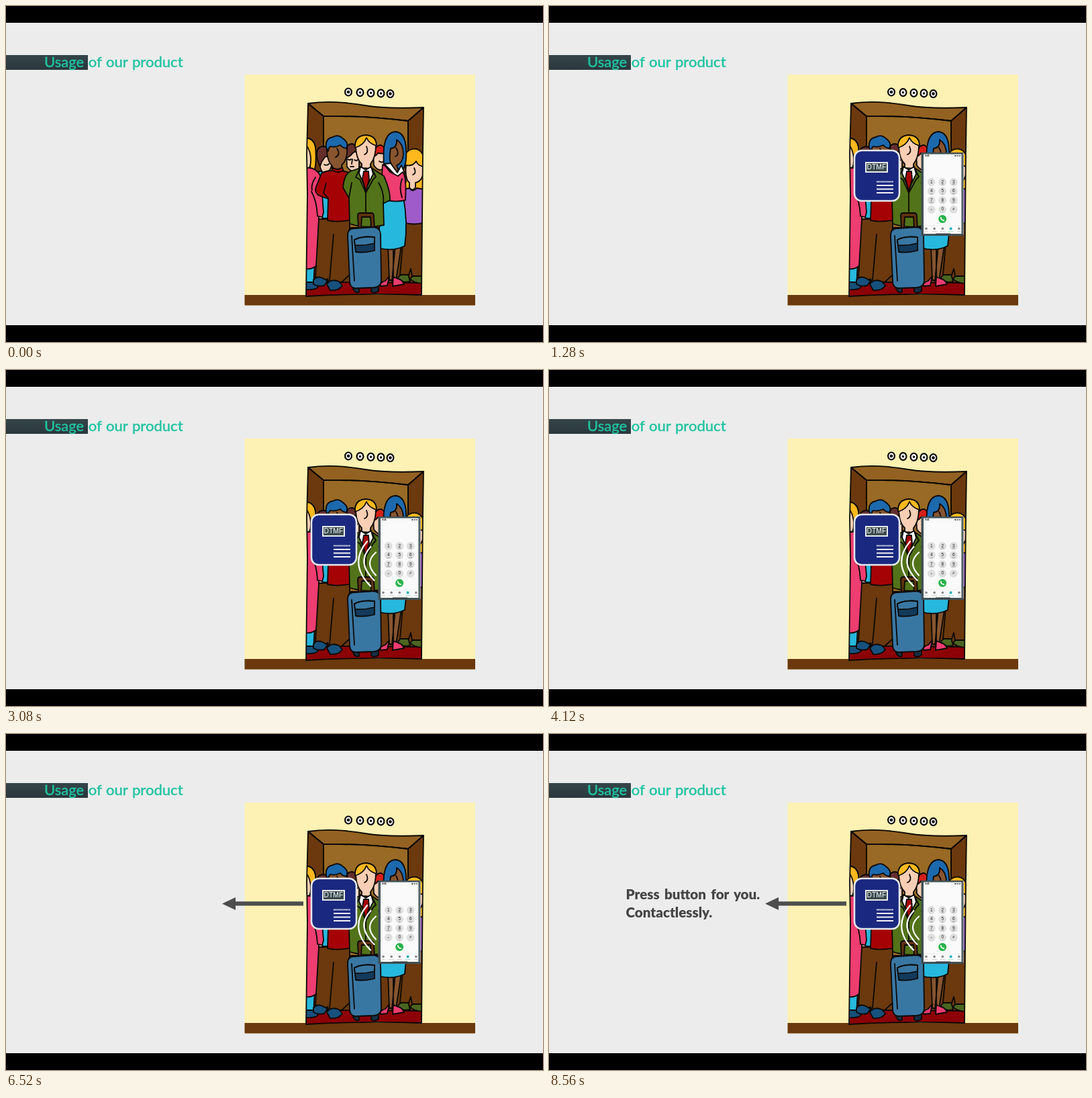
Write an HTML page that moves like this. It is 800x500 px and loops after 8600 ms.

```html
<!DOCTYPE html>
<html lang="en">
<head>
<meta charset="utf-8">
<title>Usage of our product</title>
<style>
html, body { margin: 0; width: 100%; height: 100%; overflow: hidden; background: #000; }
svg { display: block; width: 800px; height: 500px; }
.ink { stroke: #0b0805; stroke-width: 1.8; stroke-linejoin: round; stroke-linecap: round; }
.line { fill: none; }
.title { font: 500 22px Lato, "Open Sans", sans-serif; word-spacing: 1px; fill: #1fc3a0; stroke: #1fc3a0; stroke-width: .3; }
.claim { font: 900 20.6px Lato, "Open Sans", sans-serif; word-spacing: 2.6px; fill: #454545; }
.ui { font-family: "Liberation Sans", Arial, sans-serif; }
.skin { fill: #f8cfb4; }
.dark { fill: #87552f; }
.brown { fill: #6b390d; }
.yellow { fill: #fcb81d; }
.blue { fill: #1c69ae; }
.pink { fill: #ee3d70; }
.cyan { fill: #27b8dd; }
.red { fill: #a50206; }
.green { fill: #527319; }
.shoe { fill: #17517d; }
</style>
</head>
<body>
<svg viewBox="0 0 800 500" xmlns="http://www.w3.org/2000/svg">
  <defs>
    <path id="frame" d="M450 145C480 141 505 143 535 148S600 152 622 151L621 215 619 430Q530 427 447 432L449 280 448 220Z"/>
    <clipPath id="door"><use href="#frame"/></clipPath>
    <linearGradient id="tab" x2="0" y2="1">
      <stop stop-color="#344549"/><stop offset="1" stop-color="#2a373d"/>
    </linearGradient>
  </defs>
  <rect width="800" height="500"/>
  <rect y="25" width="800" height="450" fill="#ececec"/>
  <rect y="73" width="122" height="22" fill="url(#tab)"/>
  <text class="title" x="57" y="91">Usage of our product</text>

  <rect x="355.500" y="102" width="343.500" height="343.500" fill="#fdf2b3"/>
  <rect class="brown" x="355.500" y="430" width="343.500" height="15.500"/>
  <g id="lamps" class="ink"></g>

  <g class="ink" clip-path="url(#door)">
    <!-- cabin -->
    <rect class="brown" x="446" y="140" width="180" height="295"/>
    <path fill="#936222" d="M450 145L480 138 622 151 599 171Q530 163 473 164Z"/>
    <path fill="#986a25" d="M473 164Q530 163 599 171V330H473Z"/>
    <path fill="#8c0206" d="M446 416L480 411 620 412V432H446Z"/>

    <!-- back row -->
    <path class="cyan" d="M466 246H484V316H470Z"/>
    <path class="skin" d="M466 224H486Q487 246 475 249 467 247 466 224Z"/>
    <path fill="#652f2c" d="M463 222Q462 210 472 209 482 209 482 218 479 224 475 225 470 231 468 238 464 232 463 222Z"/>
    <path class="line" d="M474 236Q478 238 481 235"/>
    <path class="skin" d="M507 217H526V241Q517 252 508 239Z"/>
    <path fill="#652f2c" d="M506 220Q505 206 515 205 524 206 525 215 518 216 514 222 510 225 506 227Z"/>
    <path class="line" d="M509 228Q512 230 514 228M519 229Q522 231 524 229M516 228L515 235M513 239H518"/>
    <path class="skin" d="M547 218H565V240Q556 249 548 237Z"/>
    <path fill="#d51f18" d="M546 224Q549 207 559 207 566 210 564 220L554 219Q551 224 546 224Z"/>
    <path class="line" d="M556 231Q560 234 563 231"/>

    <!-- woman at the left edge -->
    <path class="cyan" d="M446 382H460L458 416H446Z"/>
    <path class="shoe" d="M446 411H459L465 418Q461 423 446 422Z"/>
    <path class="skin" d="M446 206H457Q458 236 450 242H446Z"/>
    <path class="yellow" d="M446 196Q459 197 461 210 463 234 459 246 454 246 453 239 457 219 446 205Z"/>
    <path class="pink" d="M446 241Q462 239 469 254L473 307 467 330V381Q459 393 446 391Z"/>
    <path class="skin" d="M466 313L472 315Q474 323 470 329L466 326Z"/>
    <path class="line" d="M461 255Q454 266 456 274M455 276Q463 290 464 313"/>

    <!-- girl at the right edge -->
    <path fill="#4b6520" d="M584 405Q587 397 599 399L602 410Q589 413 584 405ZM602 406Q608 397 623 401V413Q608 413 602 406Z"/>
    <path class="brown" d="M594 320H624V402H605L603 391 600 400H587Z"/>
    <path class="yellow" d="M594 222Q600 211 612 213 624 217 624 238V275Q603 276 592 273 590 268 596 262Z"/>
    <path class="skin" d="M596 237Q606 239 611 231 614 238 622 239 623 260 610 263V270Q605 277 601 270V263Q594 257 596 237Z"/>
    <path class="line" d="M608 241Q612 249 606 251"/>
    <path fill="#a05bcb" d="M592 273L601 271Q606 278 612 271L624 273V322Q607 327 592 322Z"/>

    <!-- man in the red sweater -->
    <path class="brown" d="M466 317H512V400L500 411H481L479 406 473 409 461 404Z"/>
    <path class="line" d="M488 340L482 408"/>
    <path class="shoe" d="M458 408Q463 401 472 405L479 409 474 416Q464 418 458 414ZM478 414Q484 405 496 410L501 416Q496 424 483 423Z"/>
    <path class="dark" d="M478 206H508Q510 228 500 237L501 247H486V238Q477 230 478 206Z"/>
    <path class="blue" d="M477 211Q475 197 487 195 495 190 503 198 511 204 507 212 501 211 498 207 489 211 484 209Q481 209 480 216Z"/>
    <path class="line" d="M493 212Q499 221 491 225"/>
    <path class="red" d="M486 240Q494 246 501 240L503 246Q516 247 520 260V317Q497 323 479 319L480 287 466 282Q459 277 462 269L470 249Q476 245 486 245Z"/>
    <path class="line" d="M486 244Q494 250 502 245M477 264L473 278 480 286"/>

    <!-- woman with the skirt -->
    <path class="dark" d="M569 356H577V408H571ZM580 356H589L581 409H575Z"/>
    <path class="pink" d="M571 402L568 416 558 417Q556 412 565 409ZM577 403L584 406Q590 407 593 414L576 417Z"/>
    <path class="cyan" d="M558 284H592Q599 323 594 357 576 366 555 360Z"/>
    <path class="blue" d="M563 237Q562 222 563 211 566 187 581 187 595 189 596 213 598 240 588 246L568 245Z"/>
    <path class="dark" d="M573 212Q583 211 582 199 592 205 592 221 591 234 582 237L585 246H573L574 235Q570 230 573 212Z"/>
    <path class="line" d="M581 211Q587 221 580 224"/>
    <path fill="#fff" d="M564 235L573 234 583 248 589 237 594 249 586 258Z"/>
    <path class="pink" d="M561 236Q565 237 572 247L584 253 591 247Q597 254 595 289 577 293 558 287Z"/>
    <path class="line" d="M590 257Q585 270 590 285"/>

    <!-- man in the green jacket -->
    <path class="skin" d="M521 206Q524 195 536 194 549 195 551 206 551 226 543 235V244H530V235Q521 227 521 206Z"/>
    <path class="yellow" d="M520 211Q519 193 536 192 552 193 552 208 541 205 537 196 533 207 520 211Z"/>
    <path class="line" d="M537 209Q541 218 534 221"/>
    <path class="green" d="M528 241L513 246Q504 250 502 270L511 286 512 324Q536 332 563 326L562 294 572 289Q573 276 563 253L546 242Z"/>
    <path fill="#fff" d="M528 239L536 244 544 239 547 250 536 272 526 249Z"/>
    <path class="red" d="M533 246H540L541 258 536 276 531 257Z"/>
    <path class="line" d="M526 244L521 255 527 258 536 278 547 258 551 254 546 244M536 278V306M515 263L511 285M555 263Q564 278 562 294"/>

    <!-- suitcase -->
    <path fill="#5e3211" d="M524 312Q524 308 528 308H544Q548 308 548 313L549 332H544L543 314H530L529 331H525Z"/>
    <path fill="#172e44" d="M516 416H526V426Q518 428 516 416ZM544 416H555V424Q549 429 544 425Z"/>
    <path fill="#3977a3" d="M509 341Q509 331 519 331L548 329Q557 330 558 339L559 409Q558 418 548 419L520 420Q512 419 512 409Z"/>
    <path class="line" d="M515 342L519 409"/>
    <path fill="#123a5b" d="M519 348Q530 342 549 344V364Q534 368 521 366Z"/>
    <path fill="#3977a3" d="M519 348Q530 342 549 344V353Q535 357 520 356Z"/>
  </g>
  <g class="ink line" stroke-width="2.400">
    <use href="#frame"/>
    <path d="M450 145L473 164V208M473 164Q530 163 599 171L622 151M599 171V215"/>
  </g>

  <g id="device">
    <rect x="455" y="215" width="67" height="75" rx="11" fill="#1a287f" stroke="#e5e8ed" stroke-width="2.500"/>
    <rect x="472" y="233" width="32" height="14" fill="#3a4a4e" stroke="#e8ebeb" stroke-width="2"/>
    <text class="ui" x="473.600" y="243.300" font-size="10.300" fill="#fff">DTMF</text>
    <g stroke="#f2f3f6" stroke-width="2">
      <path d="M488 261.500H513" stroke-dasharray="1.600 .7"/>
      <path d="M488 267H513M488 272.500H513M488 278H513"/>
    </g>
  </g>

  <g id="phone">
    <rect x="554.500" y="218" width="63" height="124" fill="#405055"/>
    <rect x="616.600" y="219" width="1" height="121" fill="#a5afb1"/>
    <rect x="558" y="220.500" width="56.500" height="118.500" fill="#fafafa"/>
    <text class="ui" x="560.500" y="224" font-size="3.200" font-weight="700">9:41</text>
    <path d="M604 222.800H607M608 222.800H610M611 222.800H613" stroke="#222" stroke-width="1.300"/>
    <g id="keys" class="ui" text-anchor="middle" fill="#222"></g>
    <circle cx="586.200" cy="317" r="6" fill="#28b34b"/>
    <path d="M583.800 314.800Q584.200 318.500 588.400 319.200" fill="none" stroke="#fff" stroke-width="1.700" stroke-linecap="round"/>
    <path d="M558 327H614.500" stroke="#e4e4e4" stroke-width=".6"/>
    <g id="tabs" class="ui" text-anchor="middle" font-size="2.300"></g>
    <path d="M576 339H598" stroke="#222" stroke-width="1"/>
  </g>

  <g id="waves" fill="none" stroke="#fff" stroke-width="2.200" stroke-linecap="round">
    <path d="M538 255Q510 288 543 321.500"/>
    <path d="M543.500 263Q521 286 548.500 313"/>
    <path d="M551 271.500Q533 287 551 305.500"/>
  </g>

  <path id="arrow" fill="#4d4d4d" d="M322 252.500L342 243V249.300H443V255.500H342V262Z"/>
  <g id="claim" class="claim">
    <text x="114.500" y="245.500">Press button for you.</text>
    <text x="114.500" y="273">Contactlessly.</text>
  </g>
</svg>
<script>
const LOOP = 8600;
const FADE = 1000;
const starts = { device: 100, phone: 100, waves: 1700, arrow: 5090, claim: 7000 };
const byId = id => document.getElementById(id);

byId('lamps').innerHTML = [510, 527.5, 543.5, 558.5, 572.5].map((x, i) => {
  const y = 128 + i * 0.65;
  return `<ellipse cx="${x}" cy="${y}" rx="4.900" ry="5.500" fill="#fff" style="stroke-width:2.2"/>
    <circle cx="${x}" cy="${y}" r="${i % 4 ? 1 : 1.6}" stroke-width="1.400"/>`;
}).join('');

const letters = ['', 'ABC', 'DEF', 'GHI', 'JKL', 'MNO', 'PQRS', 'TUV', 'WXYZ', '', '+', ''];
byId('keys').innerHTML = [...'123456789*0#'].map((key, i) => {
  const x = 569.7 + i % 3 * 16.5;
  const y = 262 + Math.floor(i / 3) * 13.6;
  const sign = '*#'.includes(key);
  return `<circle cx="${x}" cy="${y}" r="5.900" fill="#dedede"/>
    <text x="${x}" y="${y + (key === '*' ? 3.2 : 1.6)}" font-size="${sign ? 5 : 6.5}">${key}</text>
    <text x="${x}" y="${y + 4}" font-size="2">${letters[i]}</text>`;
}).join('');

byId('tabs').innerHTML = ['Favs', 'Recent', 'People', 'Keypad', 'Voice'].map((name, i) => {
  const x = 562 + i * 12.2;
  const color = i === 3 ? '#19aebb' : '#858585';
  return `<g fill="${color}"><rect x="${x - 1.8}" y="329.500" width="3.600" height="3.600" rx="${i === 3 ? 0.5 : 1.8}"/>
    <text x="${x}" y="336">${name}</text></g>`;
}).join('');

const layers = Object.entries(starts).map(([id, start]) => [byId(id), start]);

function draw(time) {
  for (const [layer, start] of layers) {
    layer.setAttribute('opacity', Math.min(1, Math.max(0, (time - start) / FADE)));
  }
}

function tick() {
  draw(performance.now() % LOOP);
  requestAnimationFrame(tick);
}
tick();
</script>
</body>
</html>
```
